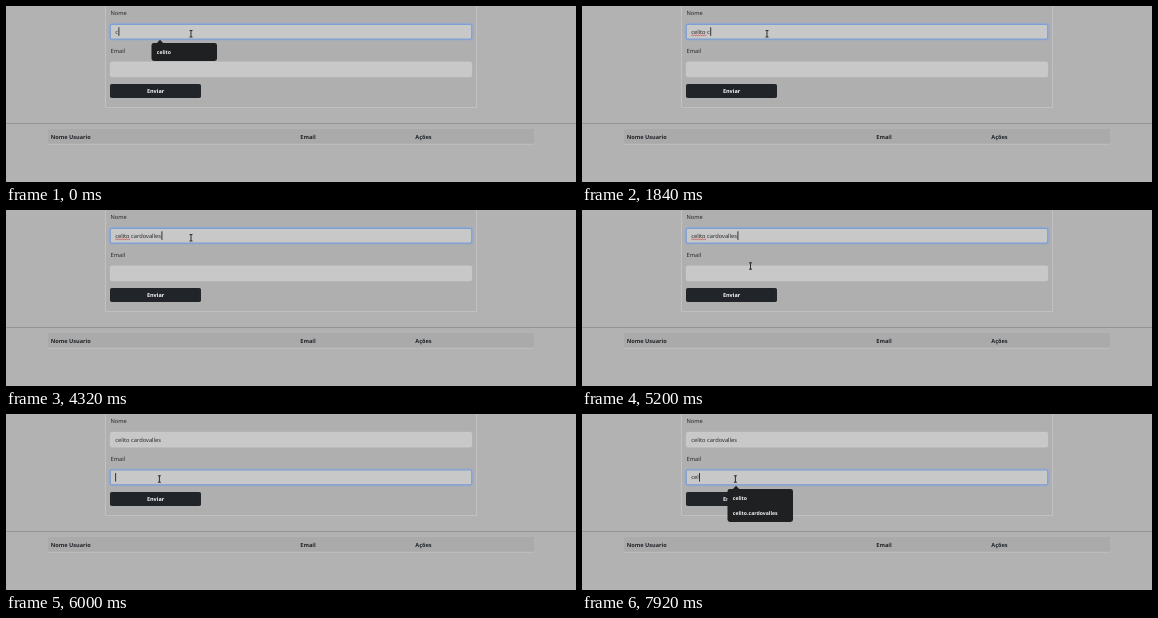
Write an HTML page that moves like this. It is 570 px wide and 176 px high and loops after 8 s.

```html
<!DOCTYPE html>
<html lang="pt-BR">
<head>
<meta charset="utf-8">
<title>Cadastro</title>
<style>
  html, body { margin: 0; width: 100%; height: 100%; overflow: hidden; background: #b2b2b2; }
  svg { display: block; width: 570px; height: 176px; }
  text { font: 5.7px "Noto Sans", "Open Sans", sans-serif; fill: #2b2b2d; text-rendering: geometricPrecision; white-space: pre; }
  .head { font-weight: 700; font-size: 5.6px; fill: #212529; }
  .button { font-weight: 600; font-size: 5.5px; fill: #f4f4f4; text-anchor: middle; }
  .field { fill: #c8c8c8; stroke: #d0d0d0; stroke-width: .6; }
  .focus .field { stroke: #7f9fd2; stroke-width: 1.2; }
  .glow { fill: none; stroke: #8fabd8; stroke-width: 1.6; opacity: 0; }
  .focus .glow { opacity: .6; }
  .caret { fill: #222; }
  .popup { fill: #1f2021; }
  .popup text { font-weight: 600; font-size: 5.15px; fill: #f2f2f2; }
  .cursor { fill: none; stroke: #1c1c1c; stroke-width: .9; }
  #arrow { fill: #f4f4f4; stroke: #222; stroke-width: .5; }
  #squiggle { fill: none; stroke: #cf4a42; stroke-width: .7; }
</style>
</head>
<body>
<svg viewBox="0 0 570 176">
  <rect width="570" height="176" fill="#b2b2b2"/>
  <path d="M99.5-1V101.5H470.5V-1" fill="#afafaf" stroke="#c6c6c6" stroke-width=".8"/>
  <text x="104.5" y="8.9">Nome</text>
  <text x="104.5" y="46.6">Email</text>

  <g id="name">
    <rect class="glow" x="103.6" y="17.6" width="362.8" height="16.2" rx="2"/>
    <rect class="field" x="104.3" y="18.3" width="361.4" height="14.8" rx="1.6"/>
    <text class="value" x="109.2" y="28"></text>
    <path id="squiggle"/>
    <rect class="caret" y="21.3" width=".9" height="8.6"/>
  </g>
  <g id="email">
    <rect class="glow" x="103.6" y="55.3" width="362.8" height="16.2" rx="2"/>
    <rect class="field" x="104.3" y="56" width="361.4" height="14.8" rx="1.6"/>
    <text class="value" x="109.2" y="65.4"></text>
    <rect class="caret" y="59" width=".9" height="8.6"/>
  </g>

  <rect x="104" y="78" width="91" height="14" rx="1.8" fill="#212529"/>
  <text class="button" x="149.6" y="87.1">Enviar</text>

  <rect y="117" width="570" height="1" fill="#939393"/>
  <rect x="42" y="123" width="486" height="15" fill="#aaaaaa"/>
  <rect x="42" y="137.8" width="486" height=".8" fill="#c2c2c2"/>
  <text class="head" x="44.7" y="133.2">Nome Usuario</text>
  <text class="head" x="294.3" y="133.2">Email</text>
  <text class="head" x="409.3" y="133.2">Ações</text>

  <g id="namePopup" class="popup">
    <path d="M150.5 37.5L154 33.8L157.5 37.5Z"/>
    <rect x="145.5" y="37" width="65.5" height="18" rx="2.4"/>
    <text x="150.8" y="47.9">celito</text>
  </g>
  <g id="emailPopup" class="popup">
    <path d="M150.5 75.5L154 71.8L157.5 75.5Z"/>
    <rect x="145.5" y="75" width="65.5" height="33" rx="2.4"/>
    <text x="150.8" y="86">celito</text>
    <text x="150.8" y="101">celito.cardovalles</text>
  </g>

  <path id="beam" class="cursor" d="M-1.5-3.2H1.5M0-3.2V3.2M-1.5 3.2H1.5"/>
  <path id="arrow" d="M0-3V4L1.6 2.5L2.7 5L3.7 4.5L2.7 2.2H4.7Z"/>
</svg>
<script>
const LOOP = 8000, TICK = 80;
const FULL_NAME = 'celito cardovalles';
const SUGGESTION = 'celito.cardovalles';

// Moment at which each character is typed
const nameKeys = [0, 80, 160, 400, 480, 560, 1680, 1840, 2160, 2480,
                  2720, 2960, 3200, 3440, 3600, 3840, 4080, 4240];
const emailKeys = [7280, 7520, 7760];
const caretOff = [[1440, 1680], [4640, 5120], [5600, 6000], [6480, 6960]];
const SWITCH = 6000;

// Pointer path: time, x, y
const path = [[0, 185, 27.8], [4720, 185, 27.8], [4800, 185, 29.3], [4960, 184, 31],
              [5120, 175, 47], [5280, 162, 65], [5360, 157, 72], [5440, 154, 74],
              [5600, 153.4, 65], [LOOP, 153.4, 65]];

const $ = id => document.getElementById(id);
const show = (el, on) => { el.style.visibility = on ? 'visible' : 'hidden'; };
const within = (t, [from, to]) => t >= from && t < to;
const typed = (text, keys, t) => text.slice(0, keys.filter(k => k <= t).length);

function drawField(id, text, focused, caretOn) {
  const group = $(id);
  const value = group.querySelector('.value');
  const caret = group.querySelector('.caret');
  group.classList.toggle('focus', focused);
  value.textContent = text;
  const width = text ? value.getComputedTextLength() : 0;
  caret.setAttribute('x', 109.2 + width + (text ? .5 : 0));
  show(caret, focused && caretOn);
}

function drawSquiggle() {
  let d = 'M109.2 29.6';
  for (let i = 1; i <= 15; i++) d += `L${109.2 + i} ${i % 2 ? 28.9 : 29.8}`;
  $('squiggle').setAttribute('d', d);
}

function drawPointer(t) {
  const i = path.findIndex(p => p[0] > t);
  const [a, b] = [path[i - 1], path[i]];
  const k = (t - a[0]) / (b[0] - a[0]);
  const x = a[1] + (b[1] - a[1]) * k;
  const y = a[2] + (b[2] - a[2]) * k;
  const overField = within(y, [18, 33]) || within(y, [56, 71]);
  for (const id of ['beam', 'arrow']) {
    $(id).setAttribute('transform', `translate(${x} ${y})`);
    show($(id), (id === 'beam') === overField);
  }
}

function frame() {
  const t = Math.floor(performance.now() % LOOP / TICK) * TICK;
  const caretOn = !caretOff.some(span => within(t, span));
  drawField('name', typed(FULL_NAME, nameKeys, t), t < SWITCH, caretOn);
  drawField('email', typed(SUGGESTION, emailKeys, t), t >= SWITCH, caretOn);
  show($('squiggle'), within(t, [1840, SWITCH]));
  show($('namePopup'), t < 640);
  show($('emailPopup'), t >= 6560);
  drawPointer(t);
  requestAnimationFrame(frame);
}

drawSquiggle();
frame();
</script>
</body>
</html>
```
